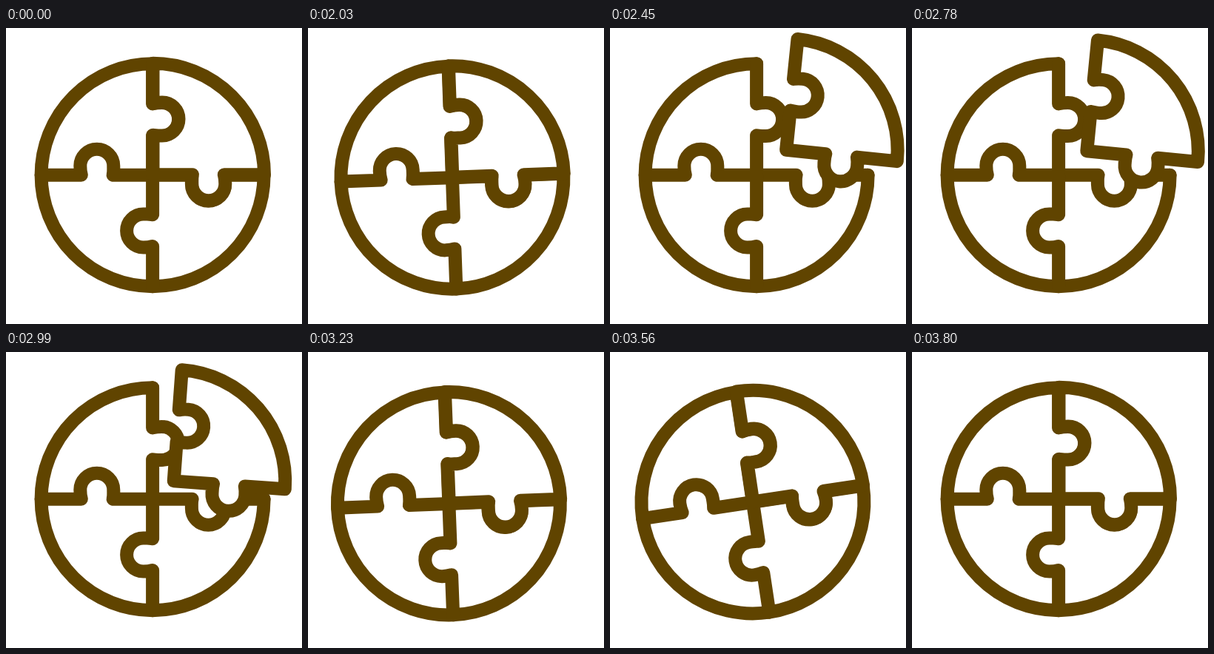
An HTML page that plays this animation: 400 px wide and 400 px high, repeating every 3.83 s.

```html
<!DOCTYPE html>
<html lang="en">
<head>
<meta charset="utf-8">
<title>Round puzzle</title>
<style>
  html, body { margin: 0; width: 100%; height: 100%; overflow: hidden; background: #fff; }
  svg { display: block; width: 100%; height: 100%; }
  .ink { fill: none; stroke: #604400; stroke-width: 18; stroke-linecap: round; stroke-linejoin: round; }

  #whole, #piece {
    transform-origin: 0 0;
    animation-duration: 3830ms;
    animation-iteration-count: infinite;
    animation-timing-function: linear;
  }
  #whole { animation-name: recoil, swing; }
  #piece { animation-name: eject; fill: #fff; }

  /* The puzzle winds up before the throw and is knocked back by the return. */
  @keyframes recoil {
    0%     { translate: 0 0; }
    52.22% { translate: 0 0; animation-timing-function: cubic-bezier(.39, .575, .565, 1); }
    56.14% { translate: -10px 11px; animation-timing-function: cubic-bezier(.4, 0, .3, 1); }
    62.66% { translate: 0 0; }
    83.29% { translate: 0 0; animation-timing-function: cubic-bezier(.25, .5, .5, 1); }
    87.99% { translate: -18px 14.5px; animation-timing-function: cubic-bezier(.25, .1, .3, 1); }
    99.22%, 100% { translate: 0 0; }
  }
  @keyframes swing {
    0%     { rotate: 0deg; }
    52.22% { rotate: 0deg; animation-timing-function: cubic-bezier(.39, .575, .565, 1); }
    56.14% { rotate: -6.5deg; animation-timing-function: cubic-bezier(.4, 0, .3, 1); }
    62.66% { rotate: 0deg; }
    83.29% { rotate: 0deg; animation-timing-function: cubic-bezier(.32, .25, .6, 1); }
    89.56% { rotate: -12.4deg; animation-timing-function: cubic-bezier(.4, .1, .6, 1); }
    99.22%, 100% { rotate: 0deg; }
  }
  @keyframes eject {
    0%     { translate: 0 0; rotate: 0deg; }
    56.14% { translate: 0 0; rotate: 0deg; animation-timing-function: cubic-bezier(.4, 0, .2, 1); }
    65.8%  { translate: 40.5px -34.2px; rotate: 6deg; animation-timing-function: cubic-bezier(.68, 0, .85, .46); }
    83.29%, 100% { translate: 0 0; rotate: 0deg; }
  }
</style>
</head>
<body>
<svg viewBox="0 0 400 400">
  <defs>
    <path id="arm" d="M0-150.5V-96.3C4-97.4 7-97.8 12.5-97.8A22.5 22.5 0 0 1 12.5-52.8C7-52.8 4-52.4 0-53.5V0"/>
  </defs>
  <g class="ink" transform="translate(198.1 198.7)">
    <g id="whole">
      <path d="M150.5 0A150.5 150.5 0 1 1 0-150.5"/>
      <use href="#arm"/>
      <use href="#arm" transform="rotate(90)"/>
      <use href="#arm" transform="rotate(180)"/>
      <use href="#arm" transform="rotate(270)"/>
      <!-- the loose quarter is opaque and sits a touch outward -->
      <g transform="translate(.4 -.5)">
        <path id="piece" d="M0-150.5A150.5 150.5 0 0 1 150.5 0
          H96.3C97.4 4 97.8 7 97.8 12.5A22.5 22.5 0 0 1 52.8 12.5C52.8 7 52.4 4 53.5 0H0
          V-53.5C4-52.4 7-52.8 12.5-52.8A22.5 22.5 0 0 0 12.5-97.8C7-97.8 4-97.4 0-96.3Z"/>
      </g>
    </g>
  </g>
</svg>
</body>
</html>
```
